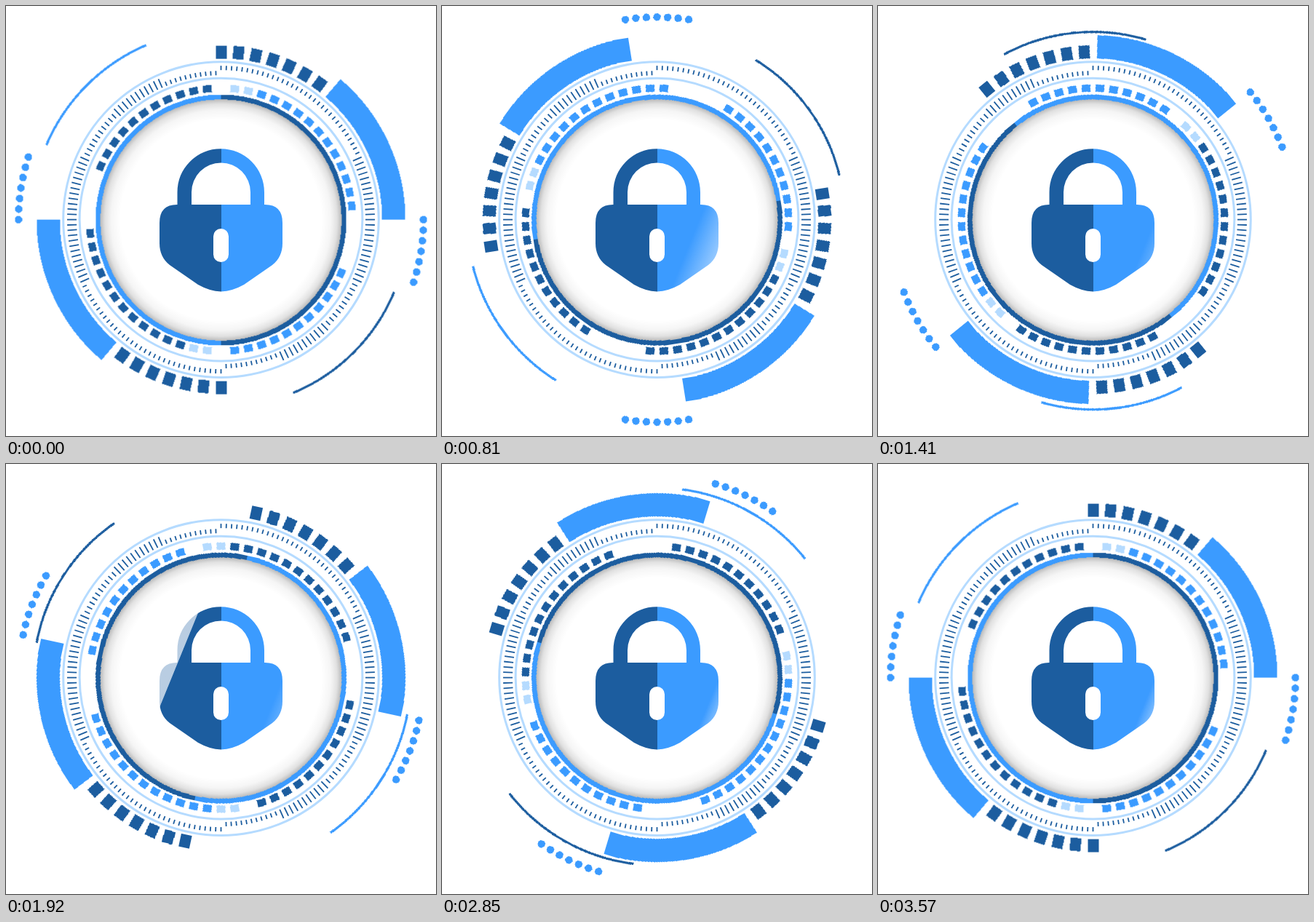
An HTML page for the animation above (3600 ms loop, 591x591 px).

```html
<!DOCTYPE html>
<html lang="en">
<head>
<meta charset="utf-8">
<title>Padlock dial</title>
<style>
  html, body { margin: 0; width: 100%; height: 100%; overflow: hidden; background: #fff; }
  svg { display: block; width: 591px; height: 591px; }
  .cw, .ccw { shape-rendering: crispEdges; }
  .cw, .ccw, .shine { animation: 3600ms -2ms infinite; }
  .cw { animation-name: cw; }
  .ccw { animation-name: ccw; }
  .shine.a { animation-name: sweep-a; }
  .shine.b { animation-name: sweep-b; }

  /* 120 steps of 30 ms; each turn closes on the last step */
  @keyframes cw {
    0% { transform: rotate(0deg); animation-timing-function: steps(60); }
    50% { transform: rotate(180deg); animation-timing-function: steps(60); }
    100% { transform: rotate(363.051deg); }
  }
  @keyframes ccw {
    0% { transform: rotate(0deg); animation-timing-function: steps(90); }
    75% { transform: rotate(-270deg); animation-timing-function: steps(30); }
    100% { transform: rotate(-363.103deg); }
  }
  @keyframes sweep-a {
    0% { transform: translateX(189px); animation-timing-function: steps(30); }
    25%, 100% { transform: translateX(460px); }
  }
  @keyframes sweep-b {
    0%, 50% { transform: translateX(189px); animation-timing-function: steps(30); }
    75%, 100% { transform: translateX(460px); }
  }
</style>
</head>
<body>
<svg viewBox="0 0 591 591" xmlns="http://www.w3.org/2000/svg">
  <defs>
    <radialGradient id="shade">
      <stop offset=".82" stop-opacity="0"/>
      <stop offset=".9" stop-opacity=".04"/>
      <stop offset=".95" stop-opacity=".12"/>
      <stop offset="1" stop-opacity=".32"/>
    </radialGradient>
    <linearGradient id="glow">
      <stop offset="0" stop-color="#fff" stop-opacity="0"/>
      <stop offset=".8" stop-color="#fff" stop-opacity=".69"/>
      <stop offset="1" stop-color="#fff" stop-opacity=".69"/>
    </linearGradient>
    <clipPath id="lock">
      <path d="M235.5 274V256a59.75 59.75 0 0 1 119.5 0V274H336V256a40.5 40.5 0 0 0-81 0V274z"/>
      <path d="M235 273H356Q380 273 380 298V326Q380 345 366 356L327 383Q311 392 295.5 392.5Q280 392 264 383L225 356Q211 345 211 326V298Q211 273 235 273z"/>
    </clipPath>
  </defs>

  <g transform="translate(295.5 293.6)">
    <g id="dial"></g>
    <g id="outer" class="cw"></g>
    <g id="inner" class="ccw"></g>
  </g>
  <g transform="translate(295.5 294.2)">
    <circle r="168" fill="url(#shade)"/>
    <g id="rim" class="cw"></g>
  </g>

  <g clip-path="url(#lock)">
    <path d="M200 190H296V400H200z" fill="#1c5d9f"/>
    <path d="M296 190H390V400H296z" fill="#3b9bff"/>
    <g class="shine a"><rect x="-82" y="180" width="82" height="230" fill="url(#glow)" transform="matrix(1 0 -.408 1 122.4 0)"/></g>
    <g class="shine b"><rect x="-82" y="180" width="82" height="230" fill="url(#glow)" transform="matrix(1 0 -.408 1 122.4 0)"/></g>
  </g>
  <rect x="285" y="306" width="21" height="46" rx="10.5" fill="#fff"/>
</svg>

<script>
  const DARK = '#1c5d9f', LIGHT = '#3b9bff', PALE = '#b5dbff';

  // Angles are degrees clockwise from the top.
  const at = (r, deg) => {
    const a = deg * Math.PI / 180;
    return `${(r * Math.sin(a)).toFixed(2)} ${(-r * Math.cos(a)).toFixed(2)}`;
  };
  const arc = (r, from, to, width, color) =>
    `<path d="M${at(r, from)}A${r} ${r} 0 0 1 ${at(r, to)}" fill="none" stroke="${color}" stroke-width="${width}"/>`;
  const block = (r, deg, w, h, color) =>
    `<rect x="${-w / 2}" y="${-r - h / 2}" width="${w}" height="${h}" fill="${color}" transform="rotate(${deg})"/>`;
  const circle = (r, width) =>
    `<circle r="${r}" fill="none" stroke="${PALE}" stroke-width="${width}"/>`;
  const dot = (r, deg) => `<circle r="5.2" cy="${-r}" fill="${LIGHT}" transform="rotate(${deg})"/>`;
  const series = (from, to, step, draw) => {
    let out = '';
    for (let a = from; a <= to; a += step) out += draw(a);
    return out;
  };
  const put = (id, markup) => { document.getElementById(id).innerHTML = markup; };

  // Each half turn: short outer ticks, long, medium, long, short inner ones.
  const tick = deg => {
    const a = deg % 180;
    const [low, top] =
      a < 66 ? [205.5, 211.5] :
      a > 156 ? [198.5, 204.5] :
      a > 114 && a < 135 ? [200.5, 208.5] : [198.5, 211.5];
    return block((top + low) / 2, deg, 1.8, top - low, DARK);
  };
  put('dial', circle(216.8, 3) + circle(194.4, 3) + series(0, 358, 2, tick));

  const half = side =>
    series(side, side + 36, 6, a => block(230.5, a, 15, 18, DARK)) +
    arc(237.5, side + 40.4, side + 90, 32, LIGHT) +
    series(side + 90, side + 108, 3, a => dot(278.3, a));
  put('outer', half(0) + half(180));

  const cells = (from, to, color) => series(from, to, 6, a => block(180.7, a, 12, 10, color));
  put('inner',
    cells(6, 12, PALE) + cells(18, 84, LIGHT) + cells(114, 174, LIGHT) +
    cells(186, 192, PALE) + cells(198, 264, DARK) + cells(294, 354, DARK) +
    arc(261, 293.1, 336.8, 3.2, LIGHT) + arc(258, 112.7, 157.4, 3.2, DARK));

  put('rim', arc(169.2, 0, 180, 6.6, DARK) + arc(169.2, 180, 360, 6.6, LIGHT));
</script>
</body>
</html>
```
